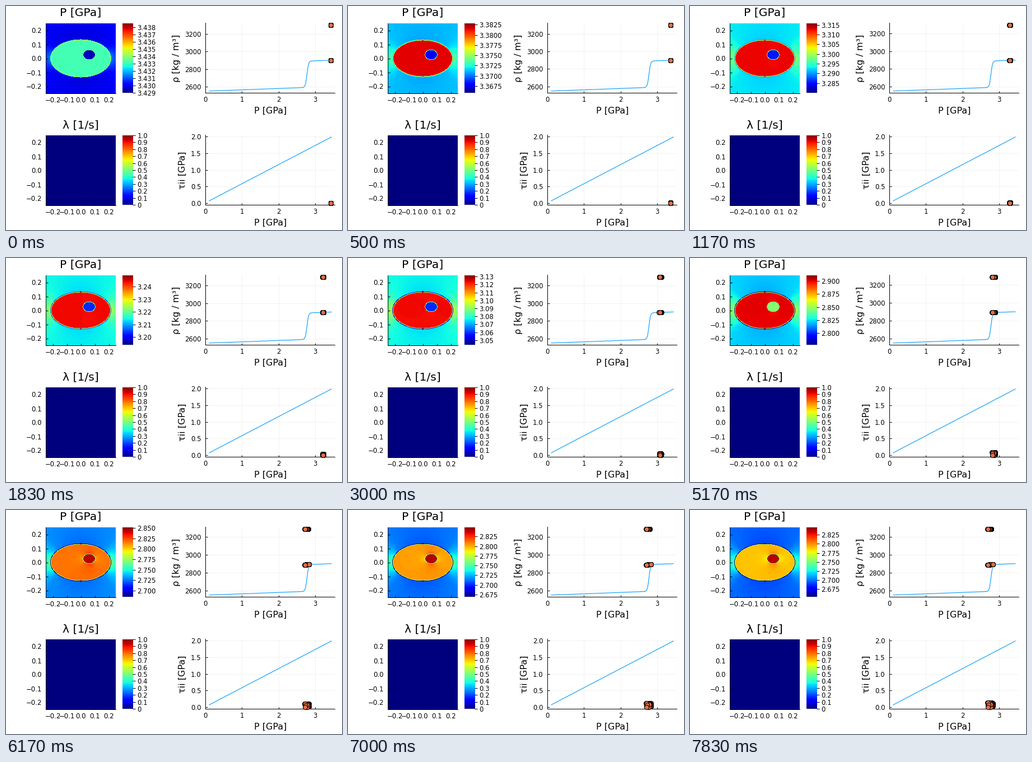
A matplotlib script that plays this animation: 600x400 px, repeating every 8000 ms.

```python
import numpy as np
import matplotlib.pyplot as plt
from matplotlib.animation import FuncAnimation

W, H, DPI = 600, 400, 100
LOOP, TICK_MS, STEPS = 8000, 50, 48
PX = 72 / DPI
TITLE, GUIDE, TICK = 20.3, 16, 11.6
BLUE, ORANGE = "#009afa", "#e26f46"

plt.rcParams["font.family"] = "DejaVu Sans"
fig = plt.figure(figsize=(W / DPI, H / DPI), dpi=DPI, facecolor="white")


class State:
    """Pressures in GPa after a number of decompression steps."""

    def __init__(self, step):
        # Unloading is steady, then slows as the rock starts to transform.
        knee = 35.5
        d = min(step, knee) + .16 * max(step - knee, 0)
        self.strain = np.sin(np.pi / 2 * min(d / 32, 1)) ** 1.2
        self.far = 3.4300 - .0196 * d
        self.host = 3.4331 - .01725 * d
        # The core follows until its own transition buffers it.
        self.core = max(3.4295 - .0206 * d, 2.848 - .0006 * (step - 28))
        self.lo = self.far - .001 - .0435 * self.strain
        self.hi = max(self.host + .0003 + .0117 * self.strain,
                      self.core + .009)
        self.stress = .0028 * step

    def share(self, p):
        return (p - self.lo) / (self.hi - self.lo)


def panel(left, top, width, height):
    ax = fig.add_axes([left / W, 1 - (top + height) / H, width / W, height / H])
    ax.set_facecolor("none")
    return ax


def label(x, y, s, size, **kw):
    """Centred text with its baseline at pixel y."""
    fig.text(x / W, 1 - y / H, s, fontsize=size * PX, ha="center",
             va="baseline", rotation_mode="anchor", **kw)


def style_ticks(ax, axis, pad, length=3.5, direction="in"):
    ax.tick_params(axis=axis, labelsize=TICK * PX, pad=pad * PX,
                   length=length * PX, width=PX, direction=direction)


def style_spines(ax):
    ax.spines[["top", "right"]].set_visible(False)
    ax.spines[["left", "bottom"]].set_linewidth(PX)


def heat_panel(top, title):
    ax = panel(71, top, 125, 125)
    img = ax.imshow(np.zeros((125, 125)), cmap="jet", vmin=0, vmax=1,
                    extent=(-.25, .25, -.25, .25), origin="lower",
                    interpolation="nearest", aspect="auto")
    marks = [-.2, -.1, 0, .1, .2]
    names = [f"{m:.1f}".replace("-", "\u2212") for m in marks]
    ax.set_xticks(marks, names)
    ax.set_yticks(marks, names)
    style_ticks(ax, "x", 5.7)
    style_ticks(ax, "y", 7)
    style_spines(ax)
    label(133.5, top - 13, title, TITLE)

    bar = panel(208, top, 18, 124)
    bar.imshow(np.linspace(0, 1, 256)[:, None], cmap="jet", origin="lower",
               extent=(0, 1, 0, 1), aspect="auto")
    bar.set_xticks([])
    bar.yaxis.tick_right()
    style_ticks(bar, "y", 3.5, 5, "out")
    bar.spines[:].set_visible(False)
    return img, bar


def curve_panel(top, name, name_x, x, y):
    ax = panel(356.4, top - .6, 231, 125)
    ax.set_xlim(-.0005, 3.5505)
    ax.set_xticks(range(4))
    style_ticks(ax, "x", 6)
    style_ticks(ax, "y", 8)
    style_spines(ax)
    ax.grid(color="black", alpha=.1, linewidth=.5 * PX)
    ax.set_axisbelow(True)
    ax.plot(x, y, color=BLUE, linewidth=PX * 1.1)
    label(472.5, top + 160.6, "P [GPa]", GUIDE)
    label(name_x, top + 62, name, GUIDE, rotation=90)
    dots, = ax.plot([], [], "o", markersize=8 * PX, markerfacecolor=ORANGE,
                    markeredgecolor="black", markeredgewidth=PX,
                    clip_on=False, zorder=5)
    return ax, dots


def bar_step(span):
    """Smallest round step that cuts the span into at most ten parts."""
    base = 10 ** (np.floor(np.log10(span)) - 1)
    return next(base * k for k in (1, 2.5, 5, 10, 25)
                if span / (base * k) <= 10 + 1e-9)


def set_bar(bar, lo, hi):
    step = bar_step(hi - lo)
    ticks = np.arange(np.ceil(lo / step), np.floor(hi / step) + 1) * step
    digits = next(d for d in range(8)
                  if abs(step * 10 ** d - round(step * 10 ** d)) < 1e-6)
    bar.set_yticks((ticks - lo) / (hi - lo), [f"{t:.{digits}f}" for t in ticks])
    bar.set_ylim(0, 1)


def edge_distance(x, y, a, b):
    """Approximate signed distance in pixels from an ellipse."""
    slope = 2 * np.hypot(x / a ** 2, y / b ** 2) + 1e-9
    return ((x / a) ** 2 + (y / b) ** 2 - 1) / slope * 250


def outer_flow(x, y, a, b):
    """Four-lobed pressure field outside an ellipse."""
    z, c, m = x + 1j * y, np.sqrt(a * a - b * b), (a - b) / (a + b)
    w = (z + np.sqrt(z - c) * np.sqrt(z + c)) / (a + b)
    return np.clip((1 / (w * w - m)).real, -1.5, 1.5)


cells = (np.arange(125) + .5) / 250 - .25
X, Y = np.meshgrid(cells, cells)
HOST, CORE = (.214, .132), (.041, .033)
XC, YC = X - .06, Y - .026
d_host = edge_distance(X, Y, *HOST)
d_core = edge_distance(XC, YC, *CORE)
lobes = outer_flow(X, Y, *HOST)
lobes = np.where(lobes > 0, lobes, .25 * lobes)
core_flow = outer_flow(XC, YC, *CORE)


def field(s):
    host, core = s.share(s.host), s.share(s.core)
    swirl = s.strain * np.interp(host - core, [-.2, .2], [-.08, .02])
    u = s.share(s.far) + (.12 + .07 * s.strain) * lobes
    inside = d_host < 0
    u[inside] = (host + swirl * core_flow)[inside]
    u[inside & (d_host >= -1)] = .6
    u[(d_host >= 0) & (d_host < 1)] = .38 - .35 * s.strain
    u[(d_core >= 0) & (d_core < 1)] = .5
    u[d_core < 0] = core
    return u


def dense(p):
    return 3300 - 20.5 * (3.432 - p)


def light(p):
    return 2850 + 15 * (p - .1)


p = np.linspace(.1, 3.45, 400)
rho = light(p) - 150 * (1 - np.tanh((p - 2.782) / .045))
strength = .0096 + p * np.sin(np.radians(35))

img, bar = heat_panel(31, "P [GPa]")
_, rate_bar = heat_panel(231, "λ [1/s]")
rate_bar.set_yticks(np.arange(11) / 10,
                    ["0"] + [f"{k / 10:.1f}" for k in range(1, 11)])

rho_ax, rho_dots = curve_panel(31, "ρ [kg / m³]", 309.5, p, rho)
rho_ax.set_yticks(range(2600, 3201, 200))
tau_ax, tau_dots = curve_panel(231, "τii [GPa]", 319.5, p, strength)
tau_ax.set_yticks(np.arange(5) / 2, [f"{k / 2:.1f}" for k in range(5)])
tau_ax.set_ylim(-.06, 2.05)

rng = np.random.default_rng(4)
spread, lift = rng.random(90), rng.random(90)


def draw(tick):
    # The picture holds between steps, six of them per second.
    step = (tick * TICK_MS + TICK_MS - 1) * STEPS // LOOP
    s = State(step)
    img.set_data(field(s))
    set_bar(bar, s.lo, s.hi)

    low = s.far - .3 * (s.far - s.lo)
    heavy = np.append(low + (s.host - low) * spread, s.far)
    cloud = low + (max(s.host, s.core) - low) * spread
    soft = np.append(cloud, [s.core, s.far])
    rho_dots.set_data(np.append(heavy, soft),
                      np.append(dense(heavy), light(soft)))
    top = dense(heavy).max()
    pad = .03 * (top - 2550)
    rho_ax.set_ylim(2550 - pad, top + pad)

    tau_dots.set_data(np.append(cloud, s.far), np.append(s.stress * lift, 0))
    return img, rho_dots, tau_dots


anim = FuncAnimation(fig, draw, frames=LOOP // TICK_MS, interval=TICK_MS,
                     init_func=lambda: draw(0), repeat=True, repeat_delay=0,
                     blit=False)
plt.show()
```
